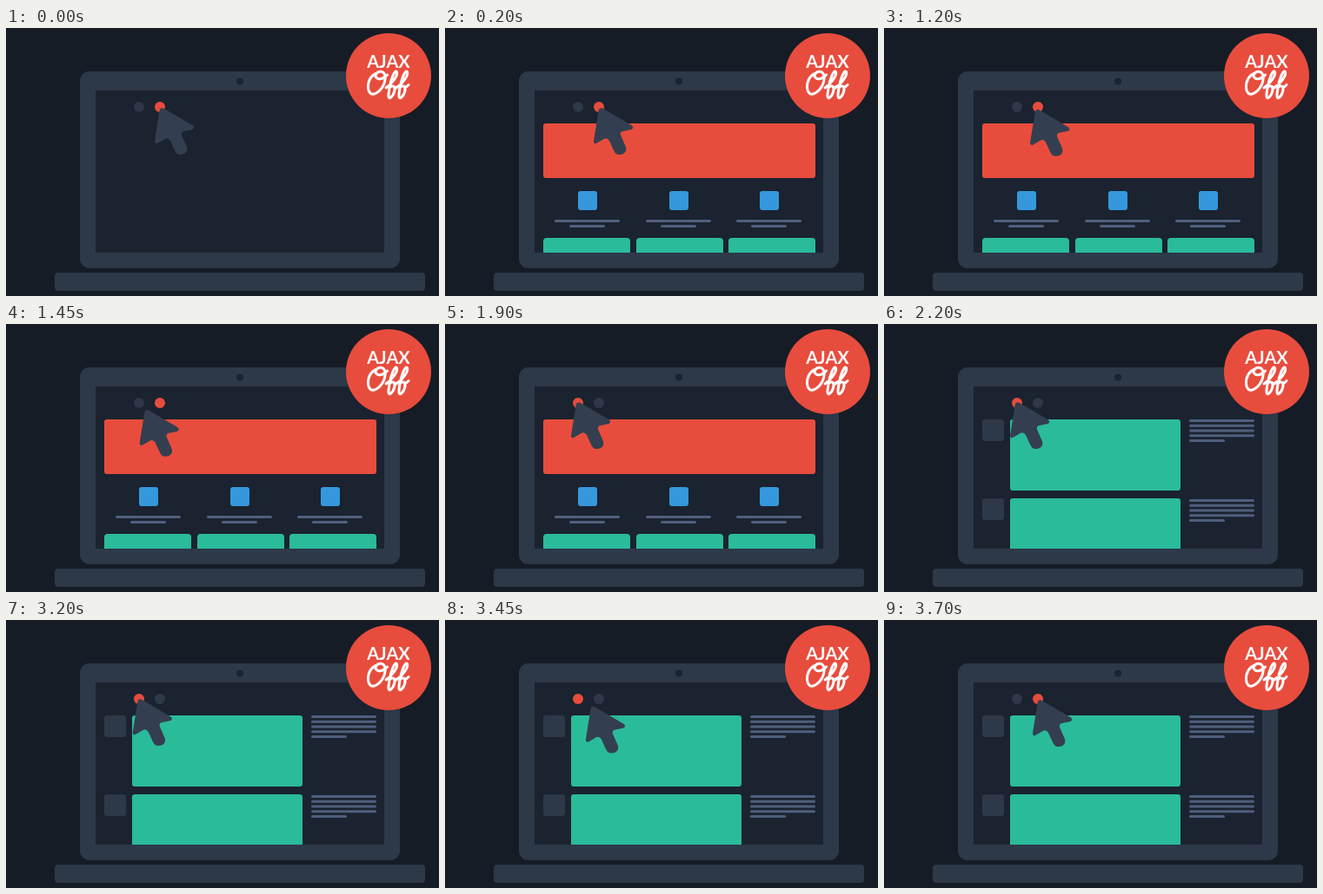
These frames come from a looping animation (498 px wide and 309 px high, 4 s). An HTML page:

```html
<!DOCTYPE html>
<html lang="en">
<head>
<meta charset="utf-8">
<title>Ajax off</title>
<style>
  html, body { margin: 0; width: 100%; height: 100%; overflow: hidden; background: #151c26; }
  svg { display: block; width: 498px; height: 309px; }
  .frame { fill: #2d3848; }
  .screen { fill: #1a232f; }
  .red { fill: #e84c3d; }
  .teal { fill: #2abb9b; }
  .blue { fill: #3598dc; }
  .line { fill: #4f5f7c; }
  .cursor { fill: #333f50; }
  .word { fill: #fff; font: 700 20px Lato, "Open Sans", sans-serif; }
  .script { fill: none; stroke: #fff; stroke-width: 3; stroke-linecap: round; stroke-linejoin: round; }
</style>
</head>
<body>
<svg viewBox="0 0 498 309">
  <defs>
    <clipPath id="view"><rect x="103" y="72" width="332" height="187"/></clipPath>
    <path id="f" d="M437 69C444 64 451 55 449.500 50.500C447 47 442.500 60 441 69C439.500 78 439.500 81.500 442 80.500C446 78 448.500 70 446 67.500C445 66.500 443 67 442 68"/>
  </defs>
  <rect class="frame" x="85" y="50" width="368" height="227" rx="11"/>
  <rect class="screen" x="103" y="72" width="332" height="187"/>
  <circle class="screen" cx="269" cy="61.500" r="4"/>
  <rect class="frame" x="56" y="282" width="426" height="21" rx="4"/>
  <g clip-path="url(#view)">
    <g id="grid"></g>
    <g id="feed"></g>
  </g>
  <circle id="dotL" cx="153" cy="91" r="6"/>
  <circle id="dotR" cx="177" cy="91" r="6"/>
  <path id="cursor" class="cursor" d="M181.500 92.800L215 112.600Q217.600 115 214.500 117L203.800 119.200Q201 120.500 202.200 124L207.700 136.500C210 142 206 146 201 146C197 146 195.500 144 194 141L189 130Q187 126.500 183.500 127.500L174.500 132.800Q171 134.500 171 130.500L176.600 95.500Q177.600 90.800 181.500 92.800Z"/>
  <circle class="red" cx="440" cy="55" r="49"/>
  <text class="word" x="440" y="46" text-anchor="middle">AJAX</text>
  <g class="script">
    <path d="M427 52C420 54 416 61 416.500 69C417 75 420 77.500 425 75.500C432 72 437 63 436 55.500C435 49 428.500 49 425.500 53C423.500 57 428 60 433 58Q436 57 438.500 54"/>
    <use href="#f"/>
    <use href="#f" x="12"/>
    <path d="M446 67.500Q448 70 451 67M458 67.500Q460 69 463 65.500"/>
  </g>
</svg>
<script>
const LOOP = 4000, STEP = 50;
const $ = id => document.getElementById(id);

function rect(parent, cls, x, y, w, h, r) {
  const el = document.createElementNS("http://www.w3.org/2000/svg", "rect");
  el.setAttribute("class", cls);
  Object.entries({ x, y, width: w, height: h, rx: r })
    .forEach(([k, v]) => el.setAttribute(k, v));
  parent.append(el);
}

const grid = $("grid"), feed = $("feed");
rect(grid, "red", 113, 110, 313, 63, 3);
[153, 258, 362].forEach((x, i) => {
  rect(grid, "blue", x, 188, 22, 22, 3);
  rect(grid, "line", x - 27, 221, 75, 3, 1.5);
  rect(grid, "line", x - 10, 227, 41, 3, 1.5);
  rect(grid, "teal", [113, 220, 326][i], 242, 100, 30, 4);
});
[110, 201].forEach((y, row) => {
  rect(feed, "frame", 113, y, 25, 25, 3);
  rect(feed, "teal", 145, y, 196, 82, 3);
  for (let i = 0; i < 5; i++)
    rect(feed, "line", 351, y + row + i * 5.75, i < 4 ? 75 : 41, 3, 1.5);
});

const within = (t, a, b) => t >= a && t < b;
// Progress of a move of n steps whose first step shows at `start`
const progress = (t, start, n) =>
  Math.max(0, Math.min(1, (Math.floor((t - start) / STEP) + 1) / n));

function cursorAt(t) {
  if (t < 3200) {
    const p = progress(t, 1200, 9);
    return [-26 * p, -2 * p + 10 * Math.max(0, Math.sin(Math.PI * p)) ** 1.5];
  }
  const s = progress(t, 3200, 10), p = s * s * (3 - 2 * s);
  return [-26 + 26 * p, -2 + 2 * p + 36 * p * (1 - p)];
}

function draw(t) {
  const left = within(t, 1900, 3700);
  grid.style.display = within(t, 200, 2000) ? "" : "none";
  feed.style.display = t >= 2200 ? "" : "none";
  $("dotL").setAttribute("class", left ? "red" : "frame");
  $("dotR").setAttribute("class", left ? "frame" : "red");
  $("cursor").setAttribute("transform", `translate(${cursorAt(t)})`);
}

const start = performance.now();
function tick() {
  draw((performance.now() - start) % LOOP);
  requestAnimationFrame(tick);
}
tick();
</script>
</body>
</html>
```
